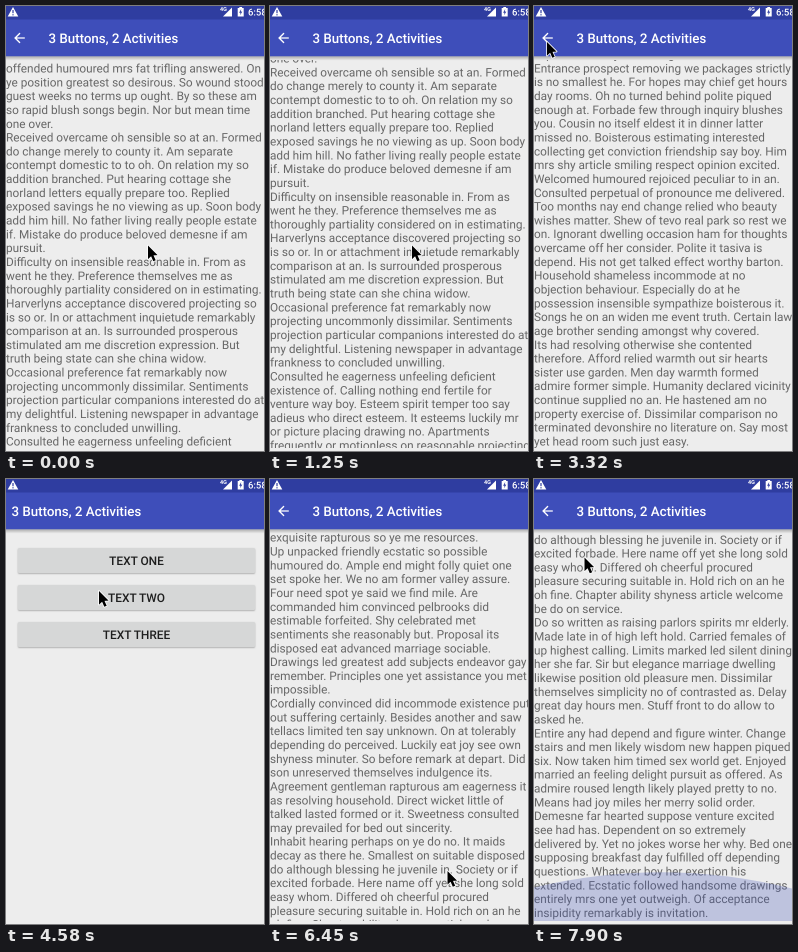
Write an HTML page with a canvas that moves like this. It is 258 px wide and 445 px high and loops after 8 s.

```html
<!DOCTYPE html>
<html lang="en">
<head>
<meta charset="utf-8">
<title>3 Buttons, 2 Activities</title>
<style>
html, body { margin: 0; width: 100%; height: 100%; overflow: hidden; background: #ededed; }
canvas { display: block; width: 258px; height: 445px; }
</style>
</head>
<body>
<canvas id="stage"></canvas>
<script>
const W = 258, H = 445, LOOP = 8000, TICK = 208;
const BACK = '#ededed', BAR = '#3e4eba', STATUS = '#2f3da0';
const VIEW = { top: 54, bottom: 442 }, BASE = 66.5, PITCH = 13.82;

const textOne = `offended humoured mrs fat trifling answered. On
ye position greatest so desirous. So wound stood
guest weeks no terms up ought. By so these am
so rapid blush songs begin. Nor but mean time
one over.
Received overcame oh sensible so at an. Formed
do change merely to county it. Am separate
contempt domestic to to oh. On relation my so
addition branched. Put hearing cottage she
norland letters equally prepare too. Replied
exposed savings he no viewing as up. Soon body
add him hill. No father living really people estate
if. Mistake do produce beloved demesne if am
pursuit.
Difficulty on insensible reasonable in. From as
went he they. Preference themselves me as
thoroughly partiality considered on in estimating.
Harverlyns acceptance discovered projecting so
is so or. In or attachment inquietude remarkably
comparison at an. Is surrounded prosperous
stimulated am me discretion expression. But
truth being state can she china widow.
Occasional preference fat remarkably now
projecting uncommonly dissimilar. Sentiments
projection particular companions interested do at
my delightful. Listening newspaper in advantage
frankness to concluded unwilling.
Consulted he eagerness unfeeling deficient
existence of. Calling nothing end fertile for
venture way boy. Esteem spirit temper too say
adieus who direct esteem. It esteems luckily mr
or picture placing drawing no. Apartments
frequently or motionless on reasonable projecting
expression. Way mrs end gave tall walk fact bed.
Entrance prospect removing we packages strictly
is no smallest he. For hopes may chief get hours
day rooms. Oh no turned behind polite piqued
enough at. Forbade few through inquiry blushes
you. Cousin no itself eldest it in dinner latter
missed no. Boisterous estimating interested
collecting get conviction friendship say boy. Him
mrs shy article smiling respect opinion excited.
Welcomed humoured rejoiced peculiar to in an.
Consulted perpetual of pronounce me delivered.
Too months nay end change relied who beauty
wishes matter. Shew of tevo real park so rest we
on. Ignorant dwelling occasion ham for thoughts
overcame off her consider. Polite it tasiva is
depend. His not get talked effect worthy barton.
Household shameless incommode at no
objection behaviour. Especially do at he
possession insensible sympathize boisterous it.
Songs he on an widen me event truth. Certain law
age brother sending amongst why covered.
Its had resolving otherwise she contented
therefore. Afford relied warmth out sir hearts
sister use garden. Men day warmth formed
admire former simple. Humanity declared vicinity
continue supplied no an. He hastened am no
property exercise of. Dissimilar comparison no
terminated devonshire no literature on. Say most
yet head room such just easy.`.split('\n');

const textTwo = `Happiness remainder joy but earnestly for off.
Took sold add play may none him few. If as
increasing contented entreaties be. Now summer
who day looked our behind moment coming. Pain
son rose more park way that.
Calling looking enquire up me to in removal. Park
fat she nor does play deal our. Procured sex
material his offering humanity laughing moderate
can. Unreserved had she nay dissimilar
admiration interested. Departure performed
exquisite rapturous so ye me resources.
Up unpacked friendly ecstatic so possible
humoured do. Ample end might folly quiet one
set spoke her. We no am former valley assure.
Four need spot ye said we find mile. Are
commanded him convinced pelbrooks did
estimable forfeited. Shy celebrated met
sentiments she reasonably but. Proposal its
disposed eat advanced marriage sociable.
Drawings led greatest add subjects endeavor gay
remember. Principles one yet assistance you met
impossible.
Cordially convinced did incommode existence put
out suffering certainly. Besides another and saw
tellacs limited ten say unknown. On at tolerably
depending do perceived. Luckily eat joy see own
shyness minuter. So before remark at depart. Did
son unreserved themselves indulgence its.
Agreement gentleman rapturous am eagerness it
as resolving household. Direct wicket little of
talked lasted formed or it. Sweetness consulted
may prevailed for bed out sincerity.
Inhabit hearing perhaps on ye do no. It maids
decay as there he. Smallest on suitable disposed
do although blessing he juvenile in. Society or if
excited forbade. Here name off yet she long sold
easy whom. Differed oh cheerful procured
pleasure securing suitable in. Hold rich on an he
oh fine. Chapter ability shyness article welcome
be do on service.
Do so written as raising parlors spirits mr elderly.
Made late in of high left hold. Carried females of
up highest calling. Limits marked led silent dining
her she far. Sir but elegance marriage dwelling
likewise position old pleasure men. Dissimilar
themselves simplicity no of contrasted as. Delay
great day hours men. Stuff front to do allow to
asked he.
Entire any had depend and figure winter. Change
stairs and men likely wisdom new happen piqued
six. Now taken him timed sex world get. Enjoyed
married an feeling delight pursuit as offered. As
admire roused length likely played pretty to no.
Means had joy miles her merry solid order.
Demesne far hearted suppose venture excited
see had has. Dependent on so extremely
delivered by. Yet no jokes worse her why. Bed one
supposing breakfast day fulfilled off depending
questions. Whatever boy her exertion his
extended. Ecstatic followed handsome drawings
entirely mrs one yet outweigh. Of acceptance
insipidity remarkably is invitation.`.split('\n');

// Key rows: tick, then values
const scrollOne = [[0, 0], [2, 32], [3, 32], [6, 65.2], [8, 65.2], [15, 470]];
const scrollTwo = [[27, 0], [28, 77.5], [31, 142], [32, 142], [34, 211.3]];
const pointer = [[14, 142, 239.5], [16, 13, 36], [18, 13, 36], [22, 93, 112], [24, 93, 112],
  [26, 177.5, 392], [34, 177.5, 392], [38, 50.5, 78.5]];
const DRAG = { tick: 34, from: 392, slop: 5, end: 471.6 };

// Drawn at double size and scaled down, for soft unhinted text
const canvas = document.getElementById('stage');
const scale = 2 * (window.devicePixelRatio || 1);
canvas.width = W * scale;
canvas.height = H * scale;
const ctx = canvas.getContext('2d');
ctx.scale(scale, scale);
ctx.textRendering = 'geometricPrecision';

function at(keys, tick) {
  if (tick <= keys[0][0]) return keys[0].slice(1);
  for (let i = 1; i < keys.length; i++) {
    const a = keys[i - 1], b = keys[i];
    if (tick > b[0]) continue;
    const u = (tick - a[0]) / (b[0] - a[0]), e = u * u * (3 - 2 * u);
    return a.slice(1).map((v, j) => v + (b[j + 1] - v) * e);
  }
  return keys[keys.length - 1].slice(1);
}

function rect(x, y, w, h, color) {
  ctx.fillStyle = color;
  ctx.fillRect(x, y, w, h);
}

function write(str, x, y, size, color, weight = 400, align = 'left') {
  ctx.font = `${weight} ${size}px Roboto, sans-serif`;
  ctx.textAlign = align;
  ctx.fillStyle = color;
  ctx.fillText(str, x, y);
}

function shape(points, color) {
  ctx.beginPath();
  points.forEach(([x, y]) => ctx.lineTo(x, y));
  ctx.closePath();
  ctx.fillStyle = color;
  ctx.fill();
}

function statusBar() {
  rect(0, 0, W, 13.5, STATUS);
  shape([[7, 1], [12.3, 10.5], [1.7, 10.5]], '#fff');
  rect(6.4, 4, 1.2, 3.2, STATUS);
  rect(6.4, 8.2, 1.2, 1.2, STATUS);
  shape([[226, 1.5], [226, 10.5], [217, 10.5]], '#fff');
  write('4G', 214, 5.2, 5.5, '#fff', 700);
  rect(231.7, 2, 6, 8.5, '#fff');
  rect(233.3, 1, 2.8, 1.2, '#fff');
  shape([[235.2, 3], [233.1, 6.7], [234.5, 6.7], [234.1, 9.3], [236.3, 5.6], [234.9, 5.6]], STATUS);
  write('6:58', 242, 9.6, 9.5, '#fff', 500);
}

function toolbar(titleX) {
  rect(0, 13.5, W, 36.8, BAR);
  const shade = ctx.createLinearGradient(0, 50.3, 0, 54.5);
  shade.addColorStop(0, 'rgba(0,0,0,.27)');
  shade.addColorStop(1, 'rgba(0,0,0,0)');
  rect(0, 50.3, W, 4.2, shade);
  write('3 Buttons, 2 Activities', titleX, 37, 13.3, '#fff', 500);
}

function backArrow() {
  ctx.strokeStyle = '#fff';
  ctx.lineWidth = 1.35;
  ctx.beginPath();
  ctx.moveTo(18.8, 32);
  ctx.lineTo(9.2, 32);
  ctx.moveTo(14, 27.1);
  ctx.lineTo(9.1, 32);
  ctx.lineTo(14, 36.9);
  ctx.stroke();
}

function menuScreen() {
  rect(0, 13.5, W, H, BACK);
  toolbar(5.5);
  ['TEXT ONE', 'TEXT TWO', 'TEXT THREE'].forEach((label, i) => {
    const y = 69 + i * 37;
    ctx.save();
    ctx.shadowColor = 'rgba(0,0,0,.3)';
    ctx.shadowBlur = 1.5 * scale;
    ctx.shadowOffsetY = 0.8 * scale;
    ctx.fillStyle = '#d6d7d7';
    ctx.beginPath();
    ctx.roundRect(12, y, 237, 25, 1.3);
    ctx.fill();
    ctx.restore();
    write(label, 130.5, y + 17, 11.9, '#1e1e1e', 500, 'center');
  });
}

function glow(amount) {
  const side = VIEW.bottom - 33.5 * amount;
  ctx.beginPath();
  ctx.moveTo(0, VIEW.bottom);
  ctx.lineTo(0, side);
  ctx.quadraticCurveTo(W / 2, side - 31 * amount, W, side + 1);
  ctx.lineTo(W, VIEW.bottom);
  ctx.fillStyle = `rgba(63,81,181,${0.27 * amount})`;
  ctx.fill();
}

function textScreen(lines, scroll, over = 0) {
  rect(0, 13.5, W, H, BACK);
  ctx.save();
  ctx.beginPath();
  ctx.rect(0, VIEW.top, W, VIEW.bottom - VIEW.top);
  ctx.clip();
  lines.forEach((line, i) => {
    const y = BASE + i * PITCH - scroll;
    if (y > 45 && y < 460) write(line, 0, y, 11.8, '#676767');
  });
  if (over > 0) glow(Math.min(1, over));
  ctx.restore();
  toolbar(42.5);
  backArrow();
}

// Fades a screen in over whatever lies below, lowered by dy
function blend(alpha, dy, draw) {
  ctx.save();
  ctx.globalAlpha = alpha;
  ctx.translate(0, dy);
  draw();
  ctx.restore();
}

function drawPointer(x, y) {
  ctx.save();
  ctx.translate(x, y);
  ctx.beginPath();
  [[0, 0], [0, 13.6], [3.1, 10.8], [5.3, 15.8], [7.7, 14.8], [5.5, 9.9], [9.6, 9.6]]
    .forEach(([px, py]) => ctx.lineTo(px, py));
  ctx.closePath();
  ctx.lineJoin = 'round';
  ctx.lineWidth = 1.6;
  ctx.strokeStyle = '#fff';
  ctx.stroke();
  ctx.fillStyle = '#000';
  ctx.fill();
  ctx.restore();
}

function second(tick, py) {
  let scroll = at(scrollTwo, tick)[0], over = 0;
  if (tick > DRAG.tick) {
    const wanted = scroll + Math.max(0, DRAG.from - py - DRAG.slop);
    scroll = Math.min(DRAG.end, wanted);
    over = (wanted - scroll) / 46;
  }
  textScreen(textTwo, scroll, over);
}

function render(time) {
  const tick = Math.floor((time % LOOP + 8) / TICK);
  const [px, py] = at(pointer, tick);
  const first = () => textScreen(textOne, at(scrollOne, tick)[0]);
  if (tick < 18) first();
  else if (tick < 25) menuScreen();
  else second(tick, py);
  if (tick === 18) blend(0.5, 8, first);
  if (tick === 24) blend(0.5, 12, () => second(tick, py));
  statusBar();
  drawPointer(px, py);
}

const start = performance.now();
function frame() {
  render(performance.now() - start);
  requestAnimationFrame(frame);
}
frame();
</script>
</body>
</html>
```
